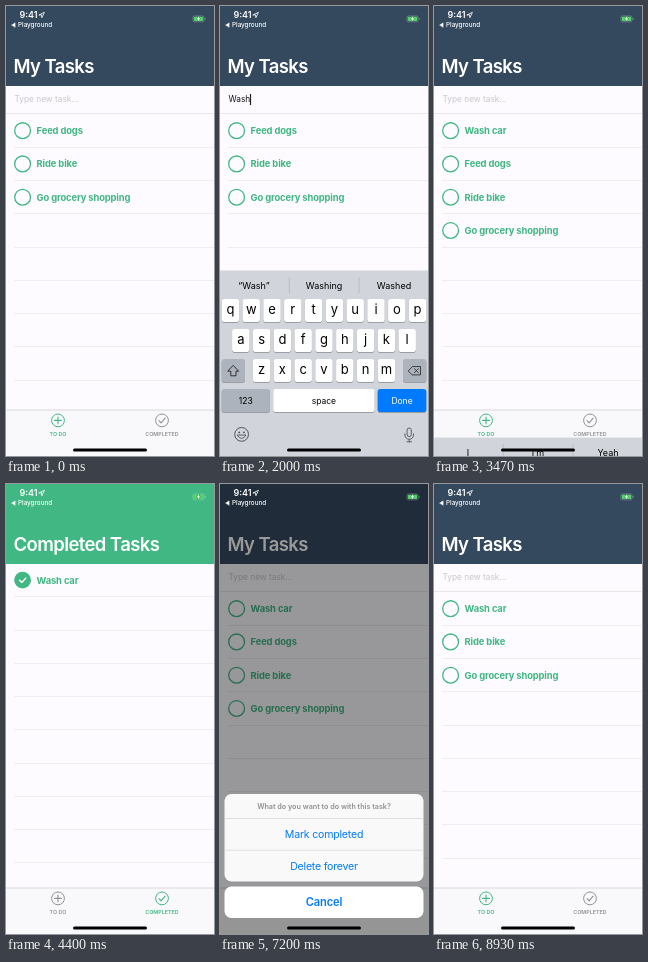
Write an HTML page that moves like this. It is 208 px wide and 450 px high and loops after 8990 ms.

```html
<!DOCTYPE html>
<html lang="en">
<head>
<meta charset="utf-8">
<title>My Tasks</title>
<style>
html, body { margin: 0; width: 100%; height: 100%; overflow: hidden; background: #fdfbff; }
svg { display: block; width: 208px; height: 450px; font-family: Inter, Roboto, sans-serif; }
text { white-space: pre; }
.title { font-size: 18.5px; font-weight: 600; letter-spacing: -.6px; fill: #fff; }
.task { font-size: 9.4px; font-weight: 700; letter-spacing: -.13px; fill: #3fb782; }
.input { font-size: 8.3px; }
.tab { font-size: 5.3px; font-weight: 600; letter-spacing: .05px; text-anchor: middle; }
.mid { text-anchor: middle; }
.act { font-size: 10.6px; letter-spacing: -.22px; fill: #007aff; text-anchor: middle; }
.cancel { font-size: 11.1px; font-weight: 600; letter-spacing: -.15px; }
</style>
</head>
<body>
<svg id="stage" viewBox="0 0 208 450"></svg>
<script>
const LOOP = 8990, ROW = 33.27, GREEN = '#41b883', NAVY = '#35495e', GRAY = '#929292';
const TODO_TOP = 108, DONE_TOP = 79.5;

// Moments of the story, in ms
const AT = {
  focus: 670, rise: 690, submit: 3250, complete: 3800, toDone: 4200,
  restore: 4870, toTodo: 5470, ask: 6710, answer: 7700, remove: 8060
};
const PHRASE = 'Wash car';
const KEY_TIMES = [1400, 1600, 1800, 2000, 2200, 2430, 2630, 2850];
const HINTS = [
  ['I', 'I’m', 'Yeah'], ['“W”', 'We', 'What'], ['“Wa”', 'Was', 'Want'],
  ['“Was”', 'Wash', 'Want'], ['“Wash”', 'Washing', 'Washed'], ['the', 'my', 'and'],
  ['“c”', 'can', 'car'], ['“ca”', 'can', 'car'], ['“car”', 'cars', 'card']
];

const text = (x, y, s, attrs = '') => `<text x="${x}" y="${y}" ${attrs}>${s}</text>`;
const rect = (x, y, w, h, fill, r = 0, attrs = '') =>
  `<rect x="${x}" y="${y}" width="${w}" height="${h}" rx="${r}" fill="${fill}" ${attrs}/>`;
const path = (d, stroke, width = 1, fill = 'none') =>
  `<path d="${d}" stroke="${stroke}" stroke-width="${width}" fill="${fill}" stroke-linecap="round" stroke-linejoin="round"/>`;
const group = (id, body) => `<g id="${id}">${body}</g>`;

function rules(top) {
  let out = '';
  for (let y = top + ROW; y < 400; y += ROW) out += rect(8, Math.floor(y), 200, 1, '#eeecf0');
  return out;
}

function taskRow(name, k, top, done) {
  const y = top + ROW * (k + .5);
  const mark = done
    ? `<circle cx="16.6" cy="${y}" r="8.4" fill="${GREEN}"/>` + path(`M13.6 ${y + .2}l2.2 2.2l4 -4.4`, '#fff', 1.4)
    : `<circle cx="16.6" cy="${y}" r="7.9" fill="none" stroke="${GREEN}" stroke-width="1.3"/>`;
  return mark + text(30.6, y + 3.5, name, 'class="task"');
}

const todoScreen = () =>
  rect(0, 0, 208, 80, NAVY) + text(7.5, 67, 'My Tasks', 'class="title"') +
  rect(0, 107, 208, 1, '#e9e7eb') + rules(TODO_TOP) +
  '<text id="field" class="input" x="8.5" y="96.4"></text>' +
  rect(8.2, 88, 1.2, 11, '#222', 0, 'id="caret"') + group('todoRows', '');

const doneScreen = () =>
  rect(0, 0, 208, 80, GREEN) + text(7.5, 67, 'Completed Tasks', 'class="title"') +
  rules(DONE_TOP) + group('doneRows', '');

function tab(id, x, label, icon) {
  return `<g id="${id}"><circle cx="${x}" cy="414.4" r="6.4" fill="none" stroke="currentColor"/>` +
    path(icon, 'currentColor', 1.1) + text(x, 429.5, label, 'class="tab" fill="currentColor"') + '</g>';
}

const tabBar = () =>
  rect(0, 404, 208, 46, '#f9f8fa') + rect(0, 403.6, 208, .8, '#cfcdd2') +
  tab('tabTodo', 52, 'TO DO', 'M48.6 414.4h6.8M52 411v6.8') +
  tab('tabDone', 156, 'COMPLETED', 'M153 414.7l2.1 2.1l4 -4.6');

const key = (x, y, w, fill) =>
  rect(x, y + .7, w, 23, '#898c91', 2.8) + rect(x, y, w, 23, fill, 2.8);

const ROWS = [['qwertyuiop', 10.4, 293], ['asdfghjkl', 20.8, 323], ['zxcvbnm', 41.6, 353]];
const eachKey = draw => ROWS.map(([chars, x, y]) =>
  [...chars].map((c, i) => draw(c, x + i * 20.8, y)).join('')).join('');

function keyboard() {
  const arrow = 'M13.4 359.6l5.3 5.6h-2.7v4.6h-5.2v-4.6h-2.7z';
  const letters = (size, dy, change) => eachKey((c, x, y) =>
    text(x, y + dy, change(c), `class="mid" font-size="${size}"`));
  return rect(0, 264.5, 208, 190, '#d1d4da') +
    rect(68.8, 271, .8, 16, '#b4b8bf') + rect(138.6, 271, .8, 16, '#b4b8bf') +
    [34, 104, 174].map((x, i) => text(x, 282.7, '', `id="hint${i}" class="mid" font-size="9"`)).join('') +
    eachKey((c, x, y) => key(x - 8.7, y, 17.4, '#fff')) +
    group('upper', letters(12.3, 16, c => c.toUpperCase()) + key(1.7, 353, 23.3, '#fff') + path(arrow, '#000', .8, '#000')) +
    group('lower', letters(13, 15.4, c => c) + key(1.7, 353, 23.3, '#adb3bc') + path(arrow, '#222', .9)) +
    key(183, 353, 23.3, '#adb3bc') +
    path('M188.5 364.7l4 -4.2h8v8.4h-8z', '#333', .9) + path('M194.4 362.7l4 4m0 -4l-4 4', '#333', .9) +
    key(1.7, 383, 48.2, '#adb3bc') + key(53.2, 383, 101.4, '#fff') + key(157.7, 383, 48.6, '#007aff') +
    text(25.8, 397.6, '123', 'class="mid" font-size="8.5"') +
    text(103.9, 397.6, 'space', 'class="mid" font-size="8.5"') +
    text(182, 397.6, 'Done', 'class="mid" font-size="8.5" fill="#fff"') +
    '<circle cx="21.6" cy="428.4" r="6.9" fill="none" stroke="#50555c"/>' +
    '<circle cx="19.2" cy="426.4" r=".9" fill="#50555c"/><circle cx="24" cy="426.4" r=".9" fill="#50555c"/>' +
    path('M17.4 429.4q4.2 6.4 8.4 0z', '#50555c', .9) +
    rect(187.1, 422, 4.2, 8.6, 'none', 2.1, 'stroke="#50555c" stroke-width=".9"') +
    path('M184.9 427.8v1.2a4.3 4.3 0 0 0 8.6 0v-1.2M189.2 433.3v2.4M186.9 435.8h4.6', '#50555c', .9);
}

const sheet = () =>
  rect(4.5, 309.5, 199, 87.5, '#f9f9fa', 7) + rect(4.5, 402, 199, 31.5, '#fff', 7) +
  rect(4.5, 333.6, 199, .7, '#d6d6d9') + rect(4.5, 365.3, 199, .7, '#d6d6d9') +
  text(104, 324.7, 'What do you want to do with this task?', 'class="mid" font-size="7.2" font-weight="600" fill="#8f8f8f"') +
  text(104, 353.8, 'Mark completed', 'class="act"') + text(104, 385.6, 'Delete forever', 'class="act"') +
  text(104, 421.8, 'Cancel', 'class="act cancel"');

const statusBar = () =>
  text(13.4, 12.2, '9:41', 'font-size="9" font-weight="600" fill="#fff"') +
  path('M33.2 8.9l5.2 -2.6l-2.5 5.4l-.5 -2.6z', '#fff', .8) +
  path('M5.6 19l3.6 -2.2v4.4z', '#fff', .3, '#fff') +
  text(12, 21.2, 'Playground', 'font-size="6.3" font-weight="500" fill="#fff"') +
  rect(186.9, 9.9, 11.2, 6, 'none', 1.7, 'stroke="#fff" stroke-opacity=".4" stroke-width=".6"') +
  rect(198.8, 11.7, .7, 2.4, '#fff', .4, 'opacity=".4"') +
  rect(187.8, 10.8, 9.4, 4.2, '#4cd964', 1) +
  path('M193.1 10.3l-2.3 2.9h1.6l-.6 2.4l2.4 -3.1h-1.6z', 'rgba(30,50,60,.45)', 1.2) +
  path('M193.1 10.3l-2.3 2.9h1.6l-.6 2.4l2.4 -3.1h-1.6z', '#fff', .2, '#fff');

document.getElementById('stage').innerHTML =
  rect(0, 0, 208, 450, '#fdfbff') +
  group('todo', todoScreen()) + group('done', doneScreen()) + tabBar() +
  rect(0, 0, 208, 450, '#000', 0, 'id="dim"') +
  group('sheet', sheet()) + group('keys', keyboard()) + statusBar() +
  rect(67, 442.4, 74, 3.1, '#000', 1.55);

const $ = id => document.getElementById(id);
const show = (id, on) => $(id).setAttribute('visibility', on ? 'inherit' : 'hidden');
const between = (t, a, b) => t >= a && t < b;

// Critically damped spring from 0 to 1
function spring(ms, w) {
  const x = Math.max(0, ms) / 1000 * w;
  return 1 - (1 + x) * Math.exp(-x);
}
const openness = (t, from, to, w) => spring(t - from, w) * (1 - spring(t - to, w));

function slide(id, amount, distance) {
  show(id, amount > .002);
  $(id).setAttribute('transform', `translate(0 ${(distance * (1 - amount)).toFixed(2)})`);
}

function setHtml(id, html) {
  const el = $(id);
  if (el.shown !== html) el.innerHTML = el.shown = html;
}

function render(t) {
  const onDone = between(t, AT.toDone, AT.toTodo);
  show('todo', !onDone);
  show('done', onDone);
  $('tabTodo').setAttribute('color', onDone ? GRAY : GREEN);
  $('tabDone').setAttribute('color', onDone ? GREEN : GRAY);

  const washed = between(t, AT.complete, AT.restore);
  const tasks = [];
  if (t >= AT.submit && !washed) tasks.push(PHRASE);
  if (t < AT.remove) tasks.push('Feed dogs');
  tasks.push('Ride bike', 'Go grocery shopping');
  setHtml('todoRows', tasks.map((s, i) => taskRow(s, i, TODO_TOP, false)).join(''));
  setHtml('doneRows', washed ? taskRow(PHRASE, 0, DONE_TOP, true) : '');

  const typed = t < AT.submit ? KEY_TIMES.filter(k => t >= k).length : 0;
  const field = $('field');
  field.textContent = typed ? PHRASE.slice(0, typed) : 'Type new task...';
  field.setAttribute('fill', typed ? '#111' : '#c7c7cd');
  show('caret', between(t, AT.focus, AT.submit));
  $('caret').setAttribute('x', 8.2 + (typed ? field.getComputedTextLength() : 0));

  show('upper', !typed);
  show('lower', typed > 0);
  HINTS[typed].forEach((s, i) => { $('hint' + i).textContent = s; });
  slide('keys', openness(t, AT.rise, AT.submit, 17.5), 186);

  const asked = openness(t, AT.ask, AT.answer, 16);
  slide('sheet', asked, 141);
  $('dim').setAttribute('opacity', (.4 * asked).toFixed(3));
}

const start = performance.now();
function tick() {
  render((performance.now() - start) % LOOP);
  requestAnimationFrame(tick);
}
tick();
</script>
</body>
</html>
```
